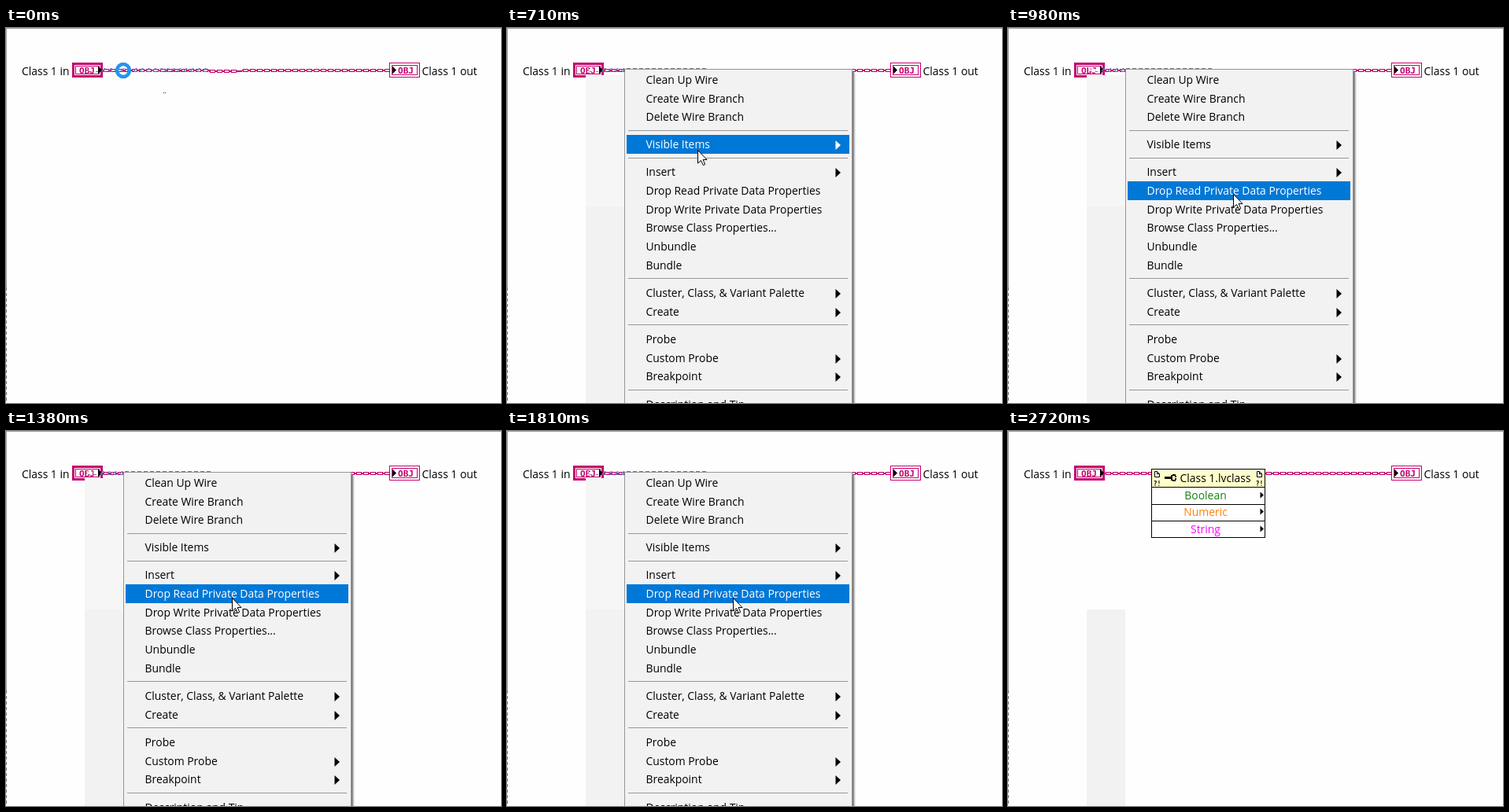
Animation, 629 px wide and 477 px high, one loop 3680 ms. Source, as an HTML page with a canvas:

```html
<!DOCTYPE html>
<html lang="en">
<meta charset="utf-8">
<title>Wire context menu</title>
<style>
html, body { margin: 0; width: 629px; height: 477px; overflow: hidden; background: #fefefe; }
canvas { display: block; }
</style>
<canvas id="stage" width="629" height="477"></canvas>
<script>
const ctx = document.getElementById('stage').getContext('2d');
const LOOP = 3680;
const PINK = '#c4006e', BLUE = '#0078d7';
const UI_FONT = '13.9px "Open Sans", "Noto Sans", sans-serif';

// [start, pointer, x, y, highlighted item]
const STEPS = [
  [0, 'ring', 149, 54], [140, 'arrow', 149, 54], [300, 'arrow', 149, 54], [450, 'arrow', 149, 54],
  [590, 'arrow', 195, 105, 'Delete Wire Branch'], [710, 'arrow', 242, 155, 'Visible Items'],
  [860, 'arrow', 272, 190, 'Insert'], [980, 'arrow', 286, 211, 'Drop Read Private Data Properties'],
  [1130, 'arrow', 287, 211], [1260, 'arrow', 287, 212], [1380, 'arrow', 287, 212],
  [1520, 'arrow', 287, 212], [1670, 'press', 288, 213], [1810, 'arrow', 287, 212],
  [1930, 'cross', 287, 213], [2450, 'cross', 450, 340], [2580, 'cross', 613, 468], [2720]
];
const MENU_OPEN = 300, MENU_CLOSED = 1930;

// [label, centre y, has submenu]
const ITEMS = [
  ['Clean Up Wire', 66], ['Create Wire Branch', 90], ['Delete Wire Branch', 113],
  ['Visible Items', 148, 1], ['Insert', 183, 1],
  ['Drop Read Private Data Properties', 207], ['Drop Write Private Data Properties', 231],
  ['Browse Class Properties...', 254], ['Unbundle', 278], ['Bundle', 302],
  ['Cluster, Class, & Variant Palette', 337, 1], ['Create', 361, 1],
  ['Probe', 396], ['Custom Probe', 420, 1], ['Breakpoint', 443, 1], ['Description and Tip...', 479]
];

function box(x, y, w, h, color) {
  ctx.fillStyle = color;
  ctx.fillRect(x, y, w, h);
}

function frame(x, y, w, h, color, line = 1) {
  ctx.strokeStyle = color;
  ctx.lineWidth = line;
  ctx.strokeRect(x + line / 2, y + line / 2, w - line, h - line);
}

function label(text, x, y, color = '#000', align = 'left', font = UI_FONT) {
  ctx.font = font;
  ctx.textAlign = align;
  ctx.fillStyle = color;
  ctx.fillText(text, x, y);
}

function shape(points, color, outline) {
  ctx.beginPath();
  points.forEach(([x, y]) => ctx.lineTo(x, y));
  ctx.closePath();
  ctx.fillStyle = color;
  ctx.fill();
  if (!outline) return;
  ctx.strokeStyle = outline;
  ctx.lineWidth = 1;
  ctx.stroke();
}

function triangle(x, y, w, h, color = '#000') {
  shape([[x, y - h], [x + w, y], [x, y + h]], color);
}

function wire(from, to, y = 52) {
  box(from, y + 1, to - from, 2, PINK);
  for (let x = from + 1; x < to - 5; x += 9) {
    box(x, y, 7, 4, PINK);
    box(x + 1, y + 1, 5, 2, '#f8dceb');
  }
}

function terminal(x, isInput) {
  box(x, 44, 39, 19, '#fff');
  frame(x, 44, 39, 19, PINK, isInput ? 3 : 1);
  frame(x + 3, 47, 33, 13, isInput ? '#fff' : PINK);
  if (isInput) frame(x + 4, 48, 31, 11, PINK);
  label('OBJ', x + (isInput ? 19 : 21), 58, PINK, 'center', 'bold 11px "DejaVu Sans Mono", monospace');
  triangle(x + (isInput ? 33 : 4), 53.5, 5, 5);
}

// Remnants of the selection crawl along the selected wire
function crawl(step, open) {
  const shift = step * 3 % 8;
  for (let x = 97 + shift; x < 256; x += 8) {
    if (x < 100) continue;
    if (x > 148 && open) {
      box(x, 51, 5, 1, '#777');
      continue;
    }
    if (x < 118) {
      box(x, 50 + x % 3, 3, 5, 'rgba(255,255,255,.8)');
      box(x + 1, 55, 3, 1, '#a06bb0');
    } else {
      shape([[x, 55], [x + 4, 51], [x + 6, 51], [x + 2, 55]], '#7182c4');
      box(x + 2, 55, 4, 1, '#5b6fb5');
    }
  }
}

function menu(active) {
  box(100, 60, 49, 167, '#f6f6f6');
  [['#777', 1], ['#999', 2], ['#c8c8c8', 3], ['#e8e8e8', 4]].forEach(([c, d]) => box(438 + d, 54 + d, 1, 423, c));
  box(149, 52, 290, 425, '#f2f2f2');
  frame(149, 52, 290, 430, '#979797');
  [130, 165, 318, 377, 460].forEach(y => box(154, y, 279, 1, '#979797'));
  for (const [text, y, sub] of ITEMS) {
    const on = text === active;
    if (on) box(152, y - 12, 283, 24, BLUE);
    label(text, 176.5, y + 5, on ? '#fff' : '#000');
    if (sub) triangle(417.5, y + 1, 6.5, 6, on ? '#fff' : '#000');
  }
}

function cornerIcon(x) {
  shape([[x + .5, 51.5], [x + 3.5, 51.5], [x + 6.5, 54.5], [x + 6.5, 58.5], [x + .5, 58.5]], '#fff', '#000');
  box(x + 3, 52, 1, 3, '#000');
  box(x + 3, 54, 3, 1, '#000');
  label('?!', x + 3.5, 70, '#000', 'center', 'bold 8px "DejaVu Sans Mono", monospace');
}

function propertyNode() {
  box(182, 48, 145, 88, '#fff');
  box(182, 48, 145, 24, '#ffffcc');
  frame(182, 48, 145, 88, '#000');
  [71, 93, 114].forEach(y => box(182, y, 145, 1, '#000'));
  cornerIcon(186);
  cornerIcon(316);
  box(199, 58, 8, 3, '#000');
  box(207, 56, 2, 7, '#000');
  box(209, 55, 4, 2, '#000');
  box(209, 62, 4, 2, '#000');
  box(212, 57, 2, 2, '#000');
  box(212, 60, 2, 2, '#000');
  label('Class 1.lvclass', 218.5, 65);
  [['Boolean', '#158015'], ['Numeric', '#ff8000'], ['String', '#ff00ff']].forEach(([text, color], i) => {
    const y = 82 + i * 21.3;
    label(text, 251, y + 5, color, 'center');
    triangle(320.5, Math.round(y) - .5, 4.5, 4);
  });
}

function pointer(kind, x, y) {
  if (kind === 'ring') {
    ctx.beginPath();
    ctx.arc(x, y, 8, 0, 7);
    ctx.strokeStyle = '#2495ee';
    ctx.lineWidth = 4.5;
    ctx.stroke();
  } else if (kind === 'cross') {
    box(x - 5, y, 11, 1, '#000');
    box(x, y - 5, 1, 11, '#000');
    box(x + 5, y - 5, 1, 1, '#000');
  } else if (kind) {
    const size = kind === 'press' ? .72 : 1;
    const outline = [[0, 0], [0, 16.5], [4, 13], [6.8, 19], [9.2, 18], [6.6, 12], [11.5, 12]];
    shape(outline.map(([px, py]) => [x + .5 + px * size, y + .5 + py * size]), '#fff', '#000');
  }
}

function draw(t) {
  const step = STEPS.findLastIndex(s => t >= s[0]);
  const [, kind, x, y] = STEPS[step];
  const open = t >= MENU_OPEN && t < MENU_CLOSED;
  const done = t >= MENU_CLOSED;
  const active = STEPS.slice(0, step + 1).findLast(s => s[4])?.[4];

  box(0, 0, 629, 477, '#fefefe');
  box(0, 0, 629, 1, '#a0a0a0');
  box(0, 0, 1, 330, '#a0a0a0');
  for (let d = 330; d < 477; d += 7) box(0, d, 1, 4, '#777');

  label('Class 1 in', 20, 60);
  label('Class 1 out', 528.5, 60);
  wire(123, 259);
  wire(258, 300, done ? 52 : 53);
  wire(300, 487);
  terminal(84, true);
  terminal(487, false);
  if (t >= MENU_OPEN) box(100, 227, 49, 250, '#f2f2f2');
  if (open) menu(active);
  if (done) propertyNode();
  else crawl(step, open);
  if (t < MENU_OPEN) {
    box(200, 82, 1, 1, '#222');
    box(202, 82, 1, 1, '#222');
  }
  pointer(kind, x, y);
}

function tick(now) {
  draw(now % LOOP);
  requestAnimationFrame(tick);
}
requestAnimationFrame(tick);
</script>
</html>
```
